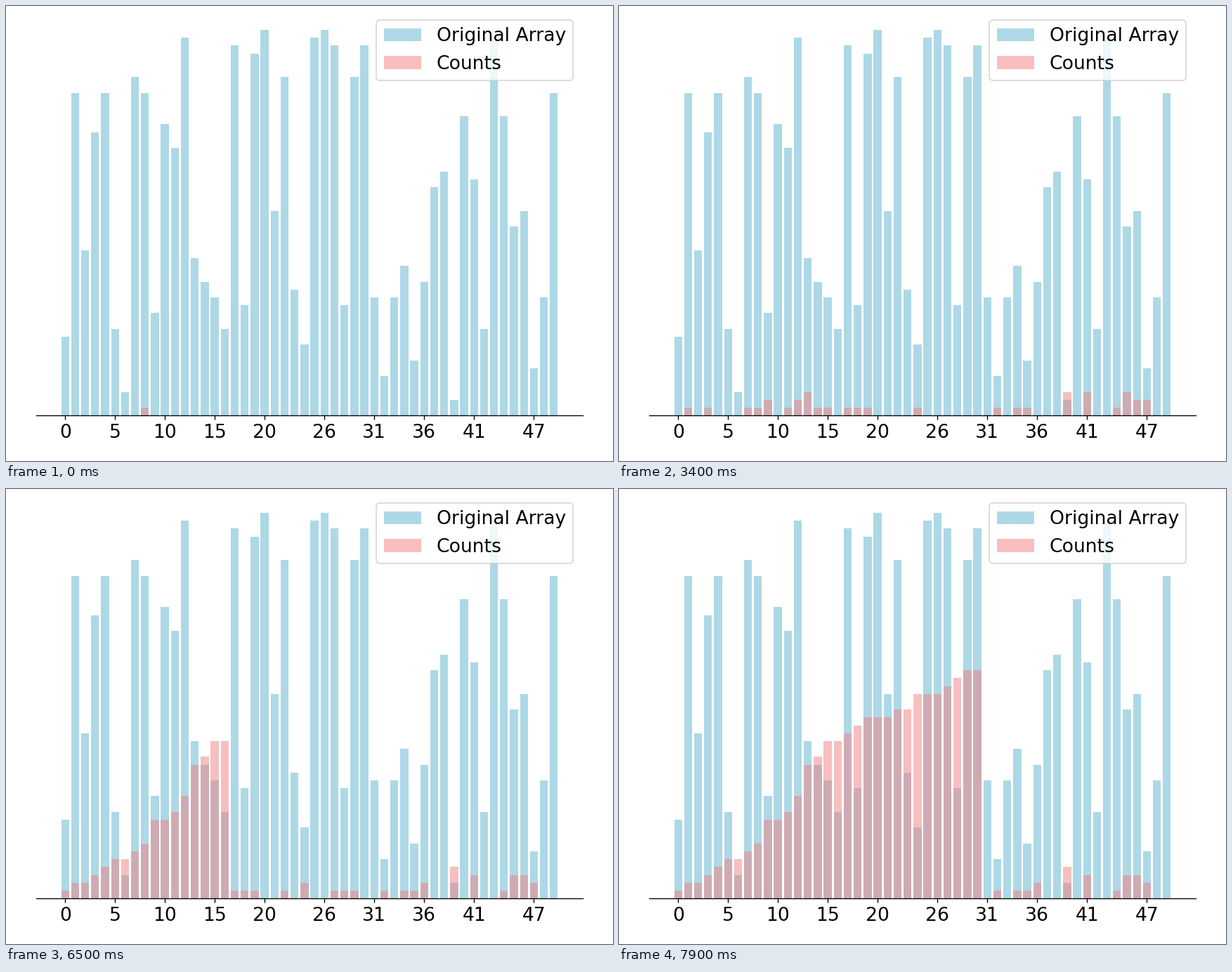
A matplotlib script for the animation above (8000 ms loop, 864 by 648 pixels).

```python
import numpy as np
import matplotlib.pyplot as plt
from matplotlib.animation import FuncAnimation

FRAMES, INTERVAL = 80, 100

values = np.array([
    10, 41, 21, 36, 41, 11, 3, 43, 41, 13, 37, 34, 48, 20, 17, 15, 11,
    47, 14, 46, 49, 26, 43, 16, 9, 48, 49, 47, 14, 43, 47, 15, 5, 15,
    19, 7, 17, 29, 31, 2, 38, 30, 11, 48, 38, 24, 26, 6, 15, 41])
n = len(values)
keys = values - values.min()
size = keys.max() + 1


def counts_at(step):
    """Tally one value per step, then turn the tallies into running sums."""
    counts = np.bincount(keys[:step + 1], minlength=size)
    if step >= n:
        end = step - n + 2
        counts[:end] = np.cumsum(counts[:end])
    return counts


plt.rcParams.update({"font.family": "DejaVu Sans", "font.size": 16})
fig, ax = plt.subplots(figsize=(7.2, 5.4), dpi=120)
fig.subplots_adjust(left=0.05, right=0.95, bottom=0.1, top=0.99)

ax.bar(range(n), values, color="lightblue", label="Original Array")
count_bars = ax.bar(range(size), np.zeros(size), color="lightcoral",
                    alpha=0.5, label="Counts")
ax.set_xlim(-0.4 - 0.05 * (n - 0.2), n - 0.6 + 0.05 * (n - 0.2))
ax.set_ylim(0, values.max() * 1.05)
ax.set_xticks(np.linspace(0, size - 1, 10).astype(int))
ax.set_yticks([])
ax.spines[["left", "top", "right"]].set_visible(False)
ax.legend(loc="upper right")


def update(step):
    for bar, height in zip(count_bars, counts_at(step)):
        bar.set_height(height)
    return count_bars.patches


anim = FuncAnimation(fig, update, frames=FRAMES, interval=INTERVAL,
                     repeat=True, repeat_delay=0)
plt.show()
```
